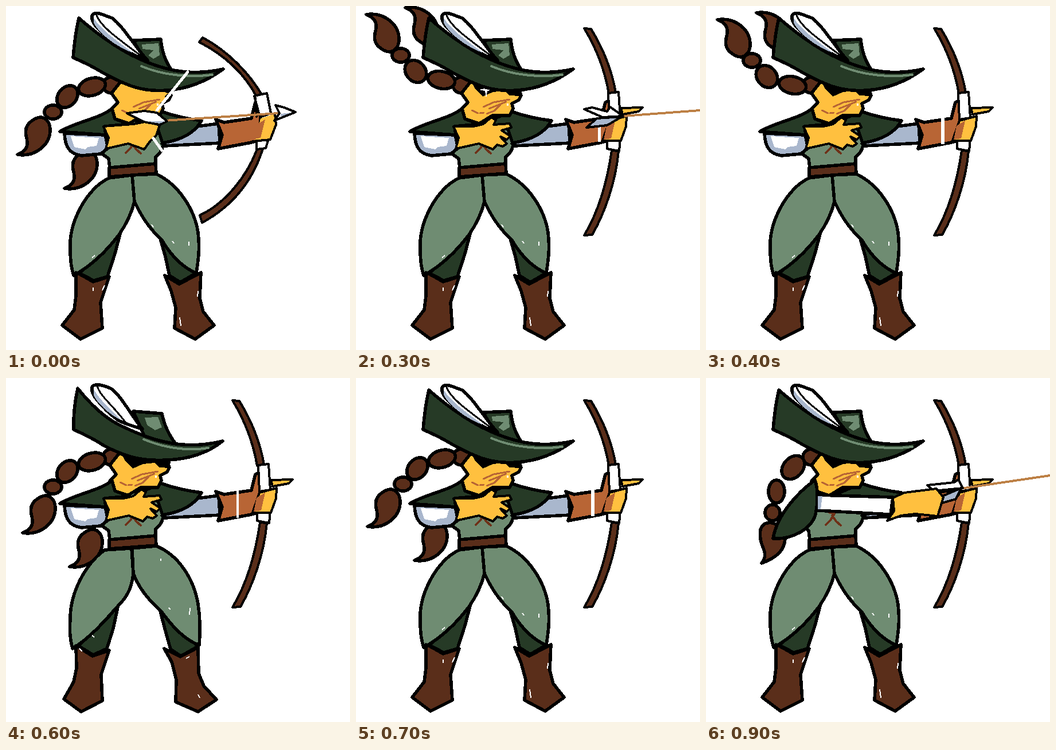
Recreate the animation shown at these times as an HTML page. Size 600 by 600 pixels, loop 1 s.

```html
<!DOCTYPE html>
<html lang="en">
<head>
<meta charset="utf-8">
<title>Archer</title>
<style>
html, body { margin: 0; width: 100%; height: 100%; overflow: hidden; background: #fff; }
svg { display: block; width: 100vw; height: 100vh; shape-rendering: crispEdges; }
.ink { stroke: #000; stroke-width: 5.6; stroke-linejoin: round; stroke-linecap: round; }
.dark { fill: #263a26; }
.moss { fill: #6f8c72; }
.brown { fill: #5a2e1a; }
.hide { fill: #b86535; }
.skin { fill: #ffc03f; }
.blue { fill: #a9b7cd; }
.white { fill: #fff; }
.bare { stroke: none; }
.line { fill: none; stroke-width: 4; }
.fine { stroke-width: 4; }

/* each pose holds, then cuts */
[class^="on-"] { visibility: hidden; animation: 1s step-end infinite; }
.on-aim { animation-name: aim; }
.on-loose { animation-name: loose; }
.on-body { animation-name: body; }
.on-alt { animation-name: alt; }
.on-nock { animation-name: nock; }
.on-arm { animation-name: arm; }
.on-free { animation-name: free; }
.on-mask { animation-name: mask; }
.on-glint { animation-name: glint; }
.on-fly { animation-name: fly; }
.on-hang { animation-name: hang; }
.on-high { animation-name: high; }
.on-fall { animation-name: fall; }
.on-slit { animation-name: slit; }
.nudge { animation: nudge 1s step-end infinite; }
@keyframes aim { 0% { visibility: visible } 30%, 100% { visibility: hidden } }
@keyframes loose { 0% { visibility: hidden } 30%, 100% { visibility: visible } }
@keyframes body { 0%, 70% { visibility: visible } 60%, 80% { visibility: hidden } 90%, 100% { visibility: visible } }
@keyframes alt { 0%, 70% { visibility: hidden } 60%, 80% { visibility: visible } 90%, 100% { visibility: hidden } }
@keyframes nock { 0% { visibility: hidden } 90%, 100% { visibility: visible } }
@keyframes arm { 0% { visibility: visible } 90%, 100% { visibility: hidden } }
@keyframes free { 0% { visibility: hidden } 30% { visibility: visible } 90%, 100% { visibility: hidden } }
@keyframes mask { 0% { visibility: hidden } 20%, 100% { visibility: visible } }
@keyframes glint { 0% { visibility: hidden } 20% { visibility: visible } 40%, 100% { visibility: hidden } }
@keyframes fly { 0% { visibility: hidden } 30% { visibility: visible } 40%, 100% { visibility: hidden } }
@keyframes hang { 0%, 70% { visibility: visible } 30%, 80%, 100% { visibility: hidden } }
@keyframes high { 0% { visibility: hidden } 40% { visibility: visible } 50%, 100% { visibility: hidden } }
@keyframes fall { 0% { visibility: hidden } 50% { visibility: visible } 60%, 100% { visibility: hidden } }
@keyframes slit { 0% { visibility: hidden } 40%, 70% { visibility: visible } 60%, 80%, 100% { visibility: hidden } }
@keyframes nudge { 0%, 70% { transform: none } 60%, 80% { transform: translate(-3px, 0) } 90%, 100% { transform: none } }
</style>
</head>
<body>
<svg viewBox="0 0 600 600" xmlns="http://www.w3.org/2000/svg">
<defs>
  <path id="tail" d="M50 197C65 189 78 199 77 219C75 245 48 264 20 259C39 252 39 240 35 226C32 210 40 203 50 197Z"/>
  <g id="beads">
    <ellipse rx="24" ry="15" transform="translate(150 141) rotate(-16)"/>
    <ellipse rx="21" ry="16" transform="translate(107 158) rotate(-50)"/>
    <ellipse cx="82" cy="185" rx="15" ry="12"/>
  </g>
  <g id="tails">
    <use href="#tail"/>
    <use href="#tail" x="82" y="59"/>
  </g>
  <g id="swept">
    <ellipse rx="24" ry="15" transform="translate(149 129) rotate(12)"/>
    <ellipse rx="21" ry="17" transform="translate(104 114) rotate(50)"/>
    <ellipse cx="78" cy="86" rx="15" ry="12"/>
    <use href="#tail" transform="matrix(1 0 0 -1 -2 274)"/>
    <use href="#tail" transform="matrix(1 0 0 -1 66 262)"/>
  </g>
</defs>

<g class="ink brown">
  <ellipse cx="184" cy="138" rx="15" ry="14"/>
  <g class="on-hang"><use href="#beads"/><use href="#tails"/></g>
  <g class="on-fly"><use href="#swept"/></g>
  <g class="on-high"><use href="#swept" x="2" y="9"/></g>
  <g class="on-fall">
    <ellipse cx="148" cy="118" rx="12" ry="10"/>
    <ellipse rx="22" ry="16" transform="translate(152 142) rotate(-12)"/>
    <ellipse cx="113" cy="131" rx="19" ry="19"/>
    <ellipse cx="83" cy="115" rx="13" ry="15"/>
    <path d="M62 42C42 52 34 77 38 96C41 108 53 114 62 108C72 103 80 91 79 80C71 86 55 75 57 65C56 54 60 49 62 42Z"/>
    <path d="M124 28C104 40 96 63 102 78C106 87 116 91 126 88Z"/>
  </g>
  <g class="on-alt"><use href="#beads" y="5"/><use href="#tails" x="9" y="11"/></g>
  <g class="on-nock">
    <ellipse rx="17" ry="23" transform="translate(152 156) rotate(42)"/>
    <path d="M103 254C119 248 137 262 138 278C138 303 119 315 97 323C110 306 97 297 95 281C93 266 95 259 103 254Z"/>
    <ellipse cx="123" cy="198" rx="14" ry="20"/>
    <ellipse cx="116" cy="235" rx="13" ry="14"/>
  </g>
</g>

<g class="on-body">
  <g class="ink">
    <path class="dark" d="M128 466L180 418L201 390L190 432L177 472L153 479ZM268 402L278 437L285 470L304 482L331 466Z"/>
    <path class="moss" d="M220 295L180 300C142 317 109 376 112 425C112 443 114 458 118 470C147 454 175 428 197 399C211 379 220 358 224 341Z"/>
    <path class="moss" d="M220 295L262 293C301 311 329 355 335 395C339 427 334 450 332 466C308 456 287 434 271 407C249 388 235 365 224 341Z"/>
    <path class="brown" d="M122 465L129 468L152 481L180 472L165 517L168 562L130 581L98 557L119 530L122 506Z"/>
    <path class="brown" d="M277 470L302 485L340 465L338 510L344 533L363 557L330 581L294 562L296 526L288 497Z"/>
  </g>
  <path d="M152 491v6M172 487l-4 9M303 543l2 15M335 497l-1 10M254 381l3 5M290 410l3 4M319 411v7M150 439l5 -4" fill="none" stroke="#fff" stroke-width="2"/>
</g>
<g class="on-alt">
  <g class="ink">
    <path class="dark" d="M126 467L178 418L196 395L187 437L176 472L152 483ZM268 403L278 441L287 473L305 485L335 468Z"/>
    <path class="moss" d="M219 297L172 300C138 325 112 374 112 420C110 443 113 461 116 472C147 453 172 424 194 399C217 377 220 358 222 341Z"/>
    <path class="moss" d="M220 297L262 293C302 309 328 352 335 394C340 426 338 449 337 466C310 456 289 432 270 406C247 386 231 365 222 341Z"/>
    <path class="brown" d="M122 467L151 485L180 475L166 517L168 563L131 582L101 560L118 530L123 506Z"/>
    <path class="brown" d="M276 472L304 486L335 470L336 515L345 537L367 561L335 582L296 565L297 526L289 495Z"/>
  </g>
  <path d="M128 472l5 5M150 449l4 3M284 401l3 3M321 401l-1 12M314 489l6 -3M335 552l3 6M270 315v4" fill="none" stroke="#fff" stroke-width="2"/>
</g>

<g class="ink">
  <path class="moss" d="M188 198L166 257L179 266L181 283L261 278L261 263C275 253 277 237 270 225L268 194Z"/>
  <path class="line" d="M214 234L224 237L217 248L209 256M220 240L227 250L235 257" style="stroke:#6e3118"/>
  <path class="brown" d="M180 282L261 275L262 292L180 298Z"/>
  <path class="blue" d="M272 240L326 211L371 205L373 239L276 244Z"/>
  <path class="dark" d="M228 202L271 184C294 192 317 197 341 200C329 222 305 234 273 239L264 212L228 212Z"/>
  <path class="hide" d="M366 198L380 203L428 196L435 168L444 164L443 234L428 238L370 249L377 225Z"/>
</g>

<g class="on-aim ink">
  <path class="brown fine" d="M343 55C388 79 425 118 447 156L437 158C413 113 378 84 337 63Z"/>
  <path class="brown fine" d="M448 249C431 303 399 347 342 378L338 365C383 344 421 296 438 249Z"/>
  <path class="white fine" d="M433 157L455 152L462 187L443 194ZM437 235L458 232L453 248L437 250Z"/>
  <path class="skin bare" d="M444 196L469 188L472 205L462 234L434 235Z"/>
  <path class="hide bare" d="M433 232L437 207L452 198L444 230Z"/>
  <path class="line" d="M469 188L471 207L461 233L430 236M435 160L437 193"/>
</g>
<g class="on-loose ink">
  <g class="nudge">
    <path class="brown fine" d="M398 39L410 40C432 76 447 115 453 151L441 153C434 111 418 72 398 39Z"/>
    <path class="brown fine" d="M458 253C453 308 433 363 412 399L398 400C422 360 438 308 446 252Z"/>
  </g>
  <path class="white fine" d="M440 152L458 150L461 195L442 198ZM438 232L461 232L459 253L438 249Z"/>
  <path class="skin fine" d="M462 178L500 177L493 184L465 189Z"/>
  <path class="skin fine" d="M442 200L472 192L471 210L462 235L430 235Z"/>
  <path class="hide bare" d="M432 233L437 209L452 200L445 231Z"/>
</g>
<path class="on-fly" d="M424 206V237" stroke="#fff" stroke-width="5"/>
<path class="on-slit" d="M413 193V241" stroke="#fff" stroke-width="6"/>
<path class="on-alt" d="M404 193V244" stroke="#fff" stroke-width="4"/>

<g class="nudge">
  <g class="ink">
    <path class="skin" d="M200 132L184 152L195 168L184 180L190 197L215 205L238 191L268 191L274 179L272 170L284 164L288 156L284 145Z"/>
    <path class="line" d="M202 182L213 187M216 187L223 186M222 176L240 168L268 163M232 179L262 167M228 188L241 183L252 172" style="stroke:#b86535;stroke-width:3"/>
  </g>
  <path d="M264 170v4" stroke="#fff" stroke-width="3"/>
</g>
<path class="on-mask" d="M201 132L207 143L221 158L239 150L259 148L268 156L285 157L288 142Z"/>
<path class="on-aim" d="M201 132L226 143L270 147L288 155L284 164L276 158L286 148L284 140Z"/>
<path class="on-glint" d="M227 133L229 144L240 146L229 148L227 161L225 148L214 146L225 144Z" fill="#fff"/>

<g class="on-body ink">
  <path class="dark" d="M222 60L270 58C272 80 279 99 290 113L244 99Z"/>
  <path class="moss bare" d="M237 67L266 65L268 86L257 92L248 86L257 77L238 75Z"/>
  <path class="dark" d="M127 21C165 54 205 82 246 98C288 115 329 121 379 110C350 131 317 145 280 147C231 151 201 133 168 116C151 105 133 97 117 90C119 64 122 43 127 21Z"/>
  <path class="line" d="M236 105C274 121 319 125 360 120" style="stroke:#6f8c72"/>
  <path class="white" d="M150 17C155 6 174 18 185 21C204 35 225 71 247 95C216 85 184 62 158 37C152 29 149 24 150 17Z"/>
  <path class="blue bare" d="M153 21C166 41 188 57 222 82C191 71 160 46 153 29Z"/>
  <path class="line" d="M157 14C164 34 185 50 244 93" style="stroke-width:3"/>
</g>
<g class="on-alt ink">
  <path class="dark" d="M222 58L272 62C276 82 285 101 297 116L242 103Z"/>
  <path class="moss bare" d="M242 69L265 68L272 86L260 91L246 82Z"/>
  <path class="dark" d="M125 18C145 43 169 67 196 81C248 107 305 128 378 110C350 132 318 142 280 143C231 146 202 134 171 118C151 105 134 97 118 90C117 63 120 42 125 18Z"/>
  <path class="line" d="M240 107C277 122 314 128 353 122" style="stroke:#6f8c72"/>
  <path class="white" d="M150 16C154 8 172 13 184 19C203 34 216 62 238 89C221 84 206 79 196 74C181 63 168 50 157 36C151 28 149 23 150 16Z"/>
  <path class="blue bare" d="M153 20C164 40 182 53 202 74C179 64 158 42 153 30Z"/>
  <path class="line" d="M159 14C165 33 186 47 209 78" style="stroke-width:3"/>
</g>

<g class="on-arm ink">
  <path class="dark" d="M94 219C122 202 162 197 185 179L190 197L216 206L172 210L174 225Z"/>
  <path class="blue" d="M102 222L173 225L178 248L165 258L132 261C110 258 103 245 102 222Z"/>
  <path class="white bare" d="M113 227L162 230L158 244L142 246L138 250L119 246Z"/>
</g>
<g class="on-free ink">
  <path class="skin fine" d="M170 210L205 210L222 206L236 194L244 199L240 207L268 205L271 212L254 217L269 227L263 233L252 228L263 240L256 245L246 242L239 250L214 240L174 249L179 230Z"/>
</g>

<g class="on-aim ink">
  <path class="skin fine" d="M170 210L222 206L248 201L268 208L262 226L252 235L241 250L213 240L174 249L179 230Z"/>
  <path class="line" d="M317 115L263 182M257 231L272 252" style="stroke:#fff;stroke-width:5"/>
  <path class="line" d="M276 200L475 187" style="stroke:#bd8045"/>
  <path class="white fine" d="M211 187L241 183L263 186L281 201L268 207L240 202Z"/>
  <path class="blue bare" d="M244 201L278 201L268 205Z"/>
  <path class="white fine" d="M470 173L485 177L505 185L485 193L468 200L477 187Z"/>
  <path class="blue bare" d="M479 188L498 186L479 193Z"/>
</g>

<g class="on-fly ink">
  <path class="line" d="M466 192L600 182" style="stroke:#bd8045"/>
  <path class="white fine" d="M398 180L412 177L438 184L443 176L466 192L430 194Z"/>
  <path class="blue fine" d="M402 212L420 196L464 193L438 208Z"/>
</g>

<g class="on-nock ink">
  <path class="line" d="M444 193L600 170" style="stroke:#bd8045"/>
  <path class="white fine" d="M386 187L433 182L440 177L448 192L397 197Z"/>
  <path class="blue fine" d="M410 207L445 192L436 211L412 218Z"/>
  <path class="dark" d="M190 178C162 198 124 237 117 280C151 282 184 263 191 238C196 214 195 191 190 178Z"/>
  <path class="white" d="M194 204L326 208L322 238L194 231Z"/>
  <path class="blue bare" d="M195 206L203 206L200 229L195 229Z"/>
  <path class="skin fine" d="M326 209L346 200L402 193L414 208L404 241L365 237L340 240L316 249L328 232Z"/>
</g>
</svg>
</body>
</html>
```
